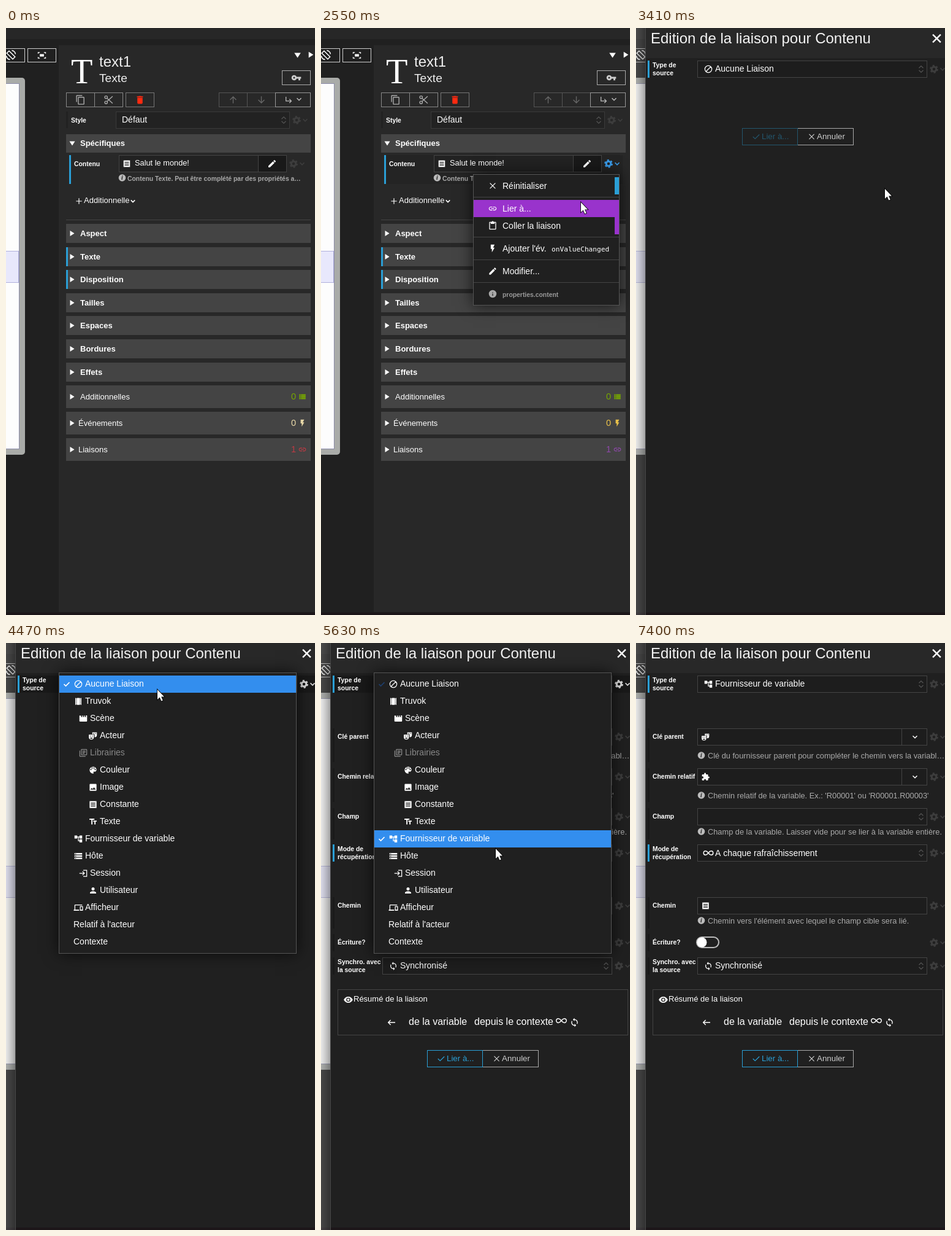
Animation of 504 by 956 pixels, one loop 7740 ms. Source, as an HTML page with a canvas:

```html
<!DOCTYPE html>
<html lang="fr">
<head>
<meta charset="utf-8">
<title>Edition de la liaison</title>
<style>
html, body { margin: 0; width: 100%; height: 100%; overflow: hidden; background: #202020; }
canvas { display: block; }
</style>
</head>
<body>
<canvas id="stage" width="504" height="956"></canvas>
<script>
const ctx = document.getElementById('stage').getContext('2d');
const LOOP = 7740, BLUE = '#2a9fd6', PURPLE = '#9933cc', WHITE = '#fff', DIM = '#3d3d3d', LINE = '#444';
const SANS = '"Liberation Sans", Arial, sans-serif';

// Icons on a 24 unit grid: filled shapes, then stroked ones.
const FILLED = {
  copy: 'M16 1H4c-1.1 0-2 .9-2 2v14h2V3h12V1zm3 4H8c-1.1 0-2 .9-2 2v14c0 1.1.9 2 2 2h11c1.1 0 2-.9 2-2V7c0-1.1-.9-2-2-2zm0 16H8V7h11v14z',
  trash: 'M6 19c0 1.1.9 2 2 2h8c1.1 0 2-.9 2-2V7H6v12zM19 4h-3.5l-1-1h-5l-1 1H5v2h14V4z',
  key: 'M12.65 10C11.83 7.67 9.61 6 7 6c-3.31 0-6 2.69-6 6s2.69 6 6 6c2.61 0 4.83-1.67 5.65-4H17v4h4v-4h2v-4H12.65zM7 14c-1.1 0-2-.9-2-2s.9-2 2-2 2 .9 2 2-.9 2-2 2z',
  edit: 'M3 17.25V21h3.75L17.81 9.94l-3.75-3.75L3 17.25zM20.71 7.04c.39-.39.39-1.02 0-1.41l-2.34-2.34c-.39-.39-1.02-.39-1.41 0l-1.83 1.83 3.75 3.75 1.83-1.83z',
  link: 'M3.9 12c0-1.71 1.39-3.1 3.1-3.1h4V7H7c-2.76 0-5 2.24-5 5s2.24 5 5 5h4v-1.9H7c-1.71 0-3.1-1.39-3.1-3.1zM8 13h8v-2H8v2zm9-6h-4v1.9h4c1.71 0 3.1 1.39 3.1 3.1s-1.39 3.1-3.1 3.1h-4V17h4c2.76 0 5-2.24 5-5s-2.24-5-5-5z',
  info: 'M12 2a10 10 0 1 0 0 20 10 10 0 0 0 0-20zm1 15h-2v-6h2v6zm0-8h-2V7h2v2z',
  bolt: 'M7 2v11h3v9l7-12h-4l4-8z',
  receipt: 'M3 22l1.5-1.5L6 22l1.5-1.5L9 22l1.5-1.5L12 22l1.5-1.5L15 22l1.5-1.5L18 22l1.5-1.5L21 22V2l-1.5 1.5L18 2l-1.5 1.5L15 2l-1.5 1.5L12 2l-1.5 1.5L9 2 7.5 3.5 6 2 4.5 3.5 3 2zM6 7h12v2H6zM6 11h12v2H6zM6 15h12v2H6z',
  paste: 'M19 2h-4.18a3 3 0 0 0-5.64 0H5c-1.1 0-2 .9-2 2v16c0 1.1.9 2 2 2h14c1.1 0 2-.9 2-2V4c0-1.1-.9-2-2-2zm0 18H5V4h2v3h10V4h2v16z',
  film: 'M18 3v2h-2V3H8v2H6V3H4v18h2v-2h2v2h8v-2h2v2h2V3h-2zM8 17H6v-2h2v2zm0-4H6v-2h2v2zm0-4H6V7h2v2zm10 8h-2v-2h2v2zm0-4h-2v-2h2v2zm0-4h-2V7h2v2z',
  scene: 'M18 4l2 4h-3l-2-4h-2l2 4h-3l-2-4H8l2 4H7L5 4H4c-1.1 0-2 .9-2 2v12c0 1.1.9 2 2 2h16c1.1 0 2-.9 2-2V4h-4z',
  masks: 'M10 3h12v7a6 6 0 0 1-6 6v-8h-6zM13 5v2h2V5zM18 5v2h2V5zM1 9h13v7a6.5 6 0 0 1-13 0zM4 12v2h2v-2zM9 12v2h2v-2zM4 17a3.5 3 0 0 0 7 0z',
  books: 'M4 6H2v14c0 1.1.9 2 2 2h14v-2H4V6zm16-4H8c-1.1 0-2 .9-2 2v12c0 1.1.9 2 2 2h12c1.1 0 2-.9 2-2V4c0-1.1-.9-2-2-2zM8 4h12v12H8zM10 6h8v2h-8zM10 9h8v2h-8zM10 12h5v2h-5z',
  palette: 'M12 3a9 9 0 0 0 0 18c.83 0 1.5-.67 1.5-1.5 0-.39-.15-.74-.39-1.01-.23-.26-.38-.61-.38-.99 0-.83.67-1.5 1.5-1.5H16c2.76 0 5-2.24 5-5 0-4.42-4.03-8-9-8zM5 9h3v3H5zM8 5h3v3H8zM13 5h3v3h-3zM16 9h3v3h-3z',
  image: 'M21 19V5c0-1.1-.9-2-2-2H5c-1.1 0-2 .9-2 2v14c0 1.1.9 2 2 2h14c1.1 0 2-.9 2-2zM8.5 13.5l2.5 3.01L14.5 12l4.5 6H5l3.5-4.5z',
  sheet: 'M3 3h18v18H3zM6 7v2h12V7zM6 11v2h12v-2zM6 15v2h12v-2z',
  letters: 'M2.5 4v3h5v12h3V7h5V4h-13zm19 5h-9v3h3v7h3v-7h3V9z',
  tree: 'M22 11V3h-7v3H9V3H2v8h7V8h2v10h4v3h7v-8h-7v3h-2V8h2v3z',
  host: 'M2 20h20v-4H2v4zm2-3h2v2H4v-2zM2 4v4h20V4H2zm4 3H4V5h2v2zm-4 7h20v-4H2v4zm2-3h2v2H4v-2z',
  person: 'M12 12a4 4 0 1 0 0-8 4 4 0 0 0 0 8zm0 2c-2.67 0-8 1.34-8 4v2h16v-2c0-2.66-5.33-4-8-4z',
  devices: 'M4 6h18V4H4c-1.1 0-2 .9-2 2v11H0v3h14v-3H4V6zm19 2h-6c-.55 0-1 .45-1 1v10c0 .55.45 1 1 1h6c.55 0 1-.45 1-1V9c0-.55-.45-1-1-1zm-1 9h-4v-7h4v7z',
  eye: 'M12 4.5C7 4.5 2.73 7.61 1 12c1.73 4.39 6 7.5 11 7.5s9.27-3.11 11-7.5c-1.73-4.39-6-7.5-11-7.5zM12 17a5 5 0 1 1 0-10 5 5 0 0 1 0 10zm0-8a3 3 0 1 0 0 6 3 3 0 0 0 0-6z',
  sync: 'M12 4V1L8 5l4 4V6c3.31 0 6 2.69 6 6 0 1.01-.25 1.97-.7 2.8l1.46 1.46C19.54 15.03 20 13.57 20 12c0-4.42-3.58-8-8-8zm0 14c-3.31 0-6-2.69-6-6 0-1.01.25-1.97.7-2.8L5.24 7.74C4.46 8.97 4 10.43 4 12c0 4.42 3.58 8 8 8v3l4-4-4-4v3z',
  puzzle: 'M20.5 11H19V7c0-1.1-.9-2-2-2h-4V3.5a2.5 2.5 0 0 0-5 0V5H4c-1.1 0-2 .9-2 2v3.8h1.5a2.7 2.7 0 0 1 0 5.4H2V20c0 1.1.9 2 2 2h3.8v-1.5a2.7 2.7 0 0 1 5.4 0V22H17c1.1 0 2-.9 2-2v-4h1.5a2.5 2.5 0 0 0 0-5z',
  list: 'M3 5h4v4H3zM3 10h4v4H3zM3 15h4v4H3zM8 5h13v4H8zM8 10h13v4H8zM8 15h13v4H8z',
  right: 'M5 3l14 9-14 9z',
  down: 'M3 5h18l-9 14z'
};
const STROKED = {
  cut: 'M3 6a3 3 0 1 0 6 0 3 3 0 1 0-6 0M3 18a3 3 0 1 0 6 0 3 3 0 1 0-6 0M8 8l13 12M8 16L21 4',
  rotate: 'M8 3L21 16 16 21 3 8zM14 2a10 10 0 0 1 8 8M10 22a10 10 0 0 1-8-8',
  focus: 'M3 8V5h4M17 5h4v3M21 16v3h-4M7 19H3v-3M8 10h8v4H8zM8 12h8',
  up: 'M12 20V5M5 12l7-7 7 7',
  downArrow: 'M12 4v15M5 12l7 7 7-7',
  left: 'M21 12H4M10 6l-6 6 6 6',
  sub: 'M5 4v11h13M14 10l5 5-5 5',
  chevron: 'M6 9l6 6 6-6',
  unfold: 'M6 9l6-6 6 6M6 15l6 6 6-6',
  plus: 'M12 4v16M4 12h16',
  close: 'M5 5l14 14M19 5L5 19',
  check: 'M3 12l6 6L21 6',
  block: 'M12 3a9 9 0 1 0 0 18 9 9 0 0 0 0-18M18 6L6 18',
  login: 'M2 12h13M10 7l5 5-5 5M12 4h9v16h-9',
  loop: 'M12 12C9 8 7.5 7.5 5.5 7.5a4.5 4.5 0 0 0 0 9C7.5 16.5 9 16 12 12s4.5-4.5 6.5-4.5a4.5 4.5 0 0 1 0 9C16.5 16.5 15 16 12 12'
};
const paths = {};
for (const set of [FILLED, STROKED]) for (const name in set) paths[name] = new Path2D(set[name]);
const ARROW = new Path2D('M0 0V16l3.7-3.5 2.6 6 2.5-1-2.6-6H11z');
const HAND = new Path2D('M-2 1.5a1.9 1.9 0 0 1 3.8 0V8l6 1.3q2.5.6 2.3 3l-1 5-1.3 4H0l-5-8.5q.5-2.5 3 0z');

function icon(name, cx, cy, size, color = WHITE, weight = 2) {
  ctx.save();
  ctx.translate(cx - size / 2, cy - size / 2);
  ctx.scale(size / 24, size / 24);
  ctx.fillStyle = ctx.strokeStyle = color;
  ctx.lineWidth = weight;
  if (FILLED[name]) ctx.fill(paths[name], 'evenodd'); else ctx.stroke(paths[name]);
  ctx.restore();
}
// y is the middle of the capitals
function text(s, x, y, size, color = WHITE, weight = '', family = SANS) {
  ctx.font = `${weight} ${size}px ${family}`;
  ctx.fillStyle = color;
  ctx.fillText(s, x, Math.round(y + size * .34));
}
const label = (s, x, y, color = WHITE) => text(s, x, y, 10.4, color, 'bold');
function box(x0, y0, x1, y1, fill, border) {
  if (fill) { ctx.fillStyle = fill; ctx.fillRect(x0, y0, x1 - x0, y1 - y0); }
  if (border) { ctx.strokeStyle = border; ctx.lineWidth = 1; ctx.strokeRect(x0 + .5, y0 + .5, x1 - x0 - 1, y1 - y0 - 1); }
}
function shadowBox(x0, y0, x1, y1, fill, border, blur) {
  ctx.save();
  ctx.shadowColor = 'rgba(0,0,0,.7)';
  ctx.shadowBlur = blur;
  box(x0, y0, x1, y1, fill);
  ctx.restore();
  box(x0, y0, x1, y1, null, border);
}
function ring(x, y, radius, width, color, dash = []) {
  ctx.setLineDash(dash);
  ctx.strokeStyle = color;
  ctx.lineWidth = width;
  ctx.beginPath();
  ctx.arc(x, y, radius, 0, 2 * Math.PI);
  ctx.stroke();
  ctx.setLineDash([]);
}
function gear(x, y, color = DIM) {
  ring(x, y, 3.8, 3, color);
  ring(x, y, 5.8, 2.2, color, [5.8 * Math.PI / 6]);
  icon('chevron', x + 14, y, 14, color, 3);
}
function infoDot(x, y) {
  ctx.fillStyle = '#bbb';
  ctx.beginPath();
  ctx.arc(x, y, 5.8, 0, 2 * Math.PI);
  ctx.fill();
  text('i', x - 1.6, y, 10, '#222', 'italic bold', '"Liberation Serif", serif');
}

function drawEditor(t) {
  box(0, 0, 504, 956, '#202020');
  box(0, 0, 504, 18, '#272727');
  box(86, 28, 504, 951, '#282828');
  box(0, 952, 504, 956, '#1c1619');

  ctx.fillStyle = '#a9aba8';
  ctx.beginPath();
  ctx.roundRect(-10, 81, 41, 614, 5);
  ctx.fill();
  box(-5, 90, 22, 686, '#fdfdfd', '#8c8caa');
  box(-5, 363, 21, 415, '#e8e8fc', '#b0b0dc');
  box(-10, 33, 31, 56, null, '#ccc');
  icon('rotate', 8, 44, 18);
  box(35, 33, 82, 56, null, '#ccc');
  icon('focus', 58.5, 44.5, 16);

  text('T', 106, 70, 58, WHITE, '', '"Liberation Serif", serif');
  text('text1', 152, 55, 24, '#eee');
  text('Texte', 152, 81, 19.2, '#eee');
  icon('down', 475.5, 44.5, 14);
  icon('right', 497.5, 43.5, 13);

  const button = (x0, x1, y, name, color, border, size = 17) => {
    box(x0, y, x1, y + 24, null, border);
    if (name) icon(name, (x0 + x1) / 2, y + 12, size, color);
  };
  button(450, 497, 69, 'key', '#ccc', '#aaa');
  button(98, 145, 105, 'copy', '#aaa', '#888');
  button(144, 191, 105, 'cut', '#aaa', '#888');
  button(195, 242, 105, 'trash', '#ff2a10', '#777');
  button(347, 394, 105, 'up', '#666', '#555');
  button(393, 440, 105, 'downArrow', '#666', '#555');
  button(439, 497, 105, '', '', '#999');
  icon('sub', 461, 117, 15, '#bbb');
  icon('chevron', 478, 116, 14, '#bbb', 2.5);

  box(98, 136, 101, 163, '#222');
  label('Style', 106, 150);
  box(179, 136, 463, 164, '#222', '#3a3a3a');
  text('Défaut', 189, 149, 14);
  icon('unfold', 453, 150, 14, '#555');
  gear(474, 150);

  const section = (y, h, title, name = 'right', x = 121, weight = 'bold') => {
    box(98, y, 497, y + h, LINE);
    icon(name, 108, y + h / 2, 12);
    text(title, x, y + h / 2 - .2, 13, WHITE, weight);
  };
  section(173, 30, 'Spécifiques', 'down');
  const hover = t >= 1400, open = t >= 1800;
  if (hover) box(106, 207, 492, 254, '#242424');
  box(103, 207, 106, 254, BLUE);
  label('Contenu', 111, 221);
  box(184, 207, 412, 235, '#222', LINE);
  icon('receipt', 197, 221, 14);
  text('Salut le monde!', 210, 220, 12.8);
  box(411, 207, 458, 235, '#191919', LINE);
  icon('edit', 434, 221, 16);
  gear(469, 221, open ? '#3a9be8' : hover ? WHITE : DIM);
  infoDot(189.5, 244);
  label('Contenu Texte. Peut être complété par des propriétés a…', 198, 245, '#aaa');
  icon('plus', 119, 282, 14);
  text('Additionnelle', 127, 281, 13);
  icon('chevron', 207, 282, 13, WHITE, 3);
  box(98, 312, 497, 313, LINE);

  ['Aspect', 'Texte', 'Disposition', 'Tailles', 'Espaces', 'Bordures', 'Effets'].forEach((title, i) => {
    const y = Math.round(319 + i * 37.6);
    section(y, 31, title);
    if (i === 1 || i === 2) box(98, y, 101, y + 31, BLUE);
  });
  [['Additionnelles', 121, '0', 'list', '#76a600'],
   ['Événements', 118, '0', 'bolt', open ? '#e8c04a' : '#e8d8a8'],
   ['Liaisons', 118, '1', 'link', open ? '#9048ac' : '#c03a44']].forEach(([title, x, count, name, color], i) => {
    const y = 582 + i * 43;
    section(y, 37, title, 'right', x, '');
    text(count, 465, y + 18, 14.5, color);
    icon(name, 483.5, y + 18.5, 14, color);
  });
}

function drawContextMenu(pointer) {
  shadowBox(248, 238, 487, 452, '#202020', '#555', 24);
  const over = y => pointer.y >= y - 14 && pointer.y < y + 14 && pointer.x < 487;
  [['close', 'Réinitialiser', 257, BLUE], ['link', 'Lier à...', 294, PURPLE], ['paste', 'Coller la liaison', 322, PURPLE],
   ['bolt', "Ajouter l'év.", 359], ['edit', 'Modifier...', 396]].forEach(([name, title, y, color]) => {
    if (color) box(over(y) ? 249 : 479, y - 14, 486, y + 14, color);
    icon(name, 280, y, 15);
    text(title, 296, y, 14);
  });
  text('onValueChanged', 376, 360, 11.2, WHITE, '', '"DejaVu Sans Mono", monospace');
  for (const y of [275, 340, 377, 414]) box(249, y, 486, y + 1, LINE);
  icon('info', 280, 433, 15, '#aaa');
  label('properties.content', 296, 434, '#999');
}

const OPTIONS = [
  ['block', 'Aucune Liaison', 0], ['film', 'Truvok', 0], ['scene', 'Scène', 8], ['masks', 'Acteur', 24],
  ['books', 'Librairies', 8], ['palette', 'Couleur', 24], ['image', 'Image', 24], ['sheet', 'Constante', 24],
  ['letters', 'Texte', 24], ['tree', 'Fournisseur de variable', 0], ['host', 'Hôte', 0], ['login', 'Session', 8],
  ['person', 'Utilisateur', 24], ['devices', 'Afficheur', 0], ['', "Relatif à l'acteur", -19], ['', 'Contexte', -19]
];
const PROVIDER = 9, LIBRARIES = 4;
function drawOption(index, y) {
  const [name, title, indent] = OPTIONS[index], color = index === LIBRARIES ? '#888' : WHITE;
  if (name) icon(name, 118 + indent, y, 15, color);
  text(title, 129 + indent, y - .5, 14, color);
}
function drawOptions(pointer, picked) {
  shadowBox(86, 48, 474, 506, '#202020', '#555', 24);
  const row = picked ? PROVIDER : Math.max(0, Math.min(PROVIDER, Math.floor((pointer.y - 53) / 28)));
  if (row !== LIBRARIES) box(87, 53 + row * 28, 473, 81 + row * 28, '#338eee');
  OPTIONS.forEach((_, i) => drawOption(i, 67 + i * 28));
  if (picked) icon('check', 99, 67, 12, '#1d3f6e', 3.5);
  icon('check', 99, picked ? 319 : 67, 12, WHITE, 3.5);
}

function drawField(lines, y, end, { blue, gearColor, hint, hintY, select, split } = {}) {
  box(19, y, 22, end, blue ? BLUE : '#1a1a1a');
  const middle = y + 14;
  lines.forEach((s, i) => label(s, 27, middle + (lines.length > 1 ? i * 13 - 7 : -.5)));
  if (lines[0] !== 'Écriture?') {
    box(100, y, 475, y + 28, '#1d1d1d', LINE);
    if (select) icon('unfold', 465, middle, 14, '#555');
    if (split) { box(433, y, 434, y + 28, LINE); icon('chevron', 455, middle, 14, WHITE, 2.5); }
  }
  gear(486, middle, gearColor);
  if (hint) { infoDot(106.5, hintY - 1); text(hint, 117, hintY, 12.8, '#aaa'); }
}
function drawForm() {
  drawField(['Clé parent'], 139, 194, { split: true, hintY: 184, hint: 'Clé du fournisseur parent pour compléter le chemin vers la variabl…' });
  icon('masks', 113.5, 153, 14);
  drawField(['Chemin relatif'], 204, 259, { split: true, hintY: 249, hint: "Chemin relatif de la variable. Ex.: 'R00001' ou 'R00001.R00003'" });
  icon('puzzle', 113.5, 218, 14);
  drawField(['Champ'], 269, 320, { select: true, hintY: 308, hint: 'Champ de la variable. Laisser vide pour se lier à la variable entière.' });
  drawField(['Mode de', 'récupération'], 328, 356, { blue: true, select: true });
  icon('loop', 118, 342, 17);
  text('A chaque rafraîchissement', 129, 342, 14);
  drawField(['Chemin'], 414, 465, { hintY: 453, hint: "Chemin vers l'élément avec lequel le champ cible sera lié." });
  icon('receipt', 113.5, 428, 14);
  drawField(['Écriture?'], 474, 502);
  ctx.strokeStyle = '#bbb';
  ctx.lineWidth = 2;
  ctx.beginPath();
  ctx.roundRect(99, 479, 36, 17, 8.5);
  ctx.stroke();
  ctx.fillStyle = WHITE;
  ctx.beginPath();
  ctx.arc(107.5, 487.5, 8, 0, 2 * Math.PI);
  ctx.fill();
  drawField(['Synchro. avec', 'la source'], 512, 540, { select: true });
  icon('sync', 118, 526, 15);
  text('Synchronisé', 129, 525, 14);

  box(27, 564, 501, 639, null, LINE);
  icon('eye', 44.5, 581, 16);
  text('Résumé de la liaison', 53, 580, 13);
  icon('left', 115, 618, 16);
  text('de la variable', 143, 617, 16);
  text('depuis le contexte', 250, 617, 16);
  icon('loop', 392, 615, 18);
  icon('sync', 413.5, 618, 16);
}
function drawPanel(t, x, picked) {
  const closed = t >= 5690;
  ctx.save();
  ctx.translate(x - 15, 0);
  shadowBox(15, -30, 520, 990, '#202020', '#484848', 26);
  box(16, 0, 504, 49, '#282828');
  text('Edition de la liaison pour Contenu', 24, 17, 24, '#f4f4f4');
  icon('close', 490.5, 17, 22, WHITE, 2.6);
  const hover = t >= 3540 && !closed;
  if (hover) box(22, 53, 504, 81, '#191919');
  drawField(['Type de', 'source'], 53, 81, { blue: true, select: true, gearColor: hover ? '#ddd' : DIM });
  drawOption(picked ? PROVIDER : 0, 67);
  if (picked) drawForm();

  const y = picked ? 663 : 163, color = picked ? BLUE : '#23566d';
  box(263, y, 355, y + 28, null, '#aaa');
  box(173, y, 264, y + 28, null, color);
  icon('check', 196, y + 14, 14, color);
  text('Lier à...', 205, y + 13.5, 13.33, color);
  icon('close', 286.5, y + 14, 14, '#ccc');
  text('Annuler', 295, y + 13.5, 13.33, '#ccc');
  box(16, 952, 504, 956, '#1c1619');
  ctx.restore();
}

// Pointer moves: start time, number of steps, end point, easing
const smooth = p => p * p * (3 - 2 * p), out = p => 1 - (1 - p) ** 2, into = p => p ** 1.6;
const MOVES = [
  [730, 12, 471, 226, out], [1530, 2, 474, 226, smooth], [2200, 4, 423, 283, smooth], [2550, 1, 424, 284, smooth],
  [3350, 5, 251, 77, smooth], [3680, 1, 246, 70, smooth], [4470, 11, 285, 316, smooth],
  [5630, 8, 285, 767, smooth], [6180, 4, 288, 791, smooth], [6920, 8, 484, 962, into]
];
function pointerAt(t) {
  let x = 480, y = 962;
  for (const [start, steps, endX, endY, ease] of MOVES) {
    if (t < start) break;
    const p = ease(Math.min(steps, 1 + Math.floor((t - start) / 65)) / steps);
    x += (endX - x) * p;
    y += (endY - y) * p;
  }
  return { x: Math.round(x), y: Math.round(y) };
}
function drawPointer(t, { x, y }) {
  if (t < 730 || t >= 7400) return;
  const shape = t >= 1530 && t < 2200 ? HAND : ARROW;
  ctx.save();
  ctx.translate(x, y);
  ctx.strokeStyle = '#000';
  ctx.lineWidth = 1.6;
  ctx.stroke(shape);
  ctx.fillStyle = WHITE;
  ctx.fill(shape);
  ctx.restore();
}

function draw(t) {
  const pointer = pointerAt(t), picked = t >= 5360;
  drawEditor(t);
  if (t >= 1800 && t < 2880) {
    ctx.globalAlpha = t < 1870 ? .5 : 1;
    drawContextMenu(pointer);
    ctx.globalAlpha = 1;
  }
  if (t >= 2880) {
    const tick = 2880 + Math.floor((t - 2880) / 66.4) * 66.4;
    const p = Math.min(1, (tick - 2850) / 300);
    box(0, 0, 504, 956, `rgba(255,255,255,${.2 * Math.min(1, p * 1.9)})`);
    drawPanel(t, Math.round(504 - 489 * out(p)), picked);
  }
  if (t >= 3940 && t < 5690) drawOptions(pointer, picked);
  drawPointer(t, pointer);
}
function frame(now) {
  draw(now % LOOP);
  requestAnimationFrame(frame);
}
requestAnimationFrame(frame);
</script>
</body>
</html>
```
